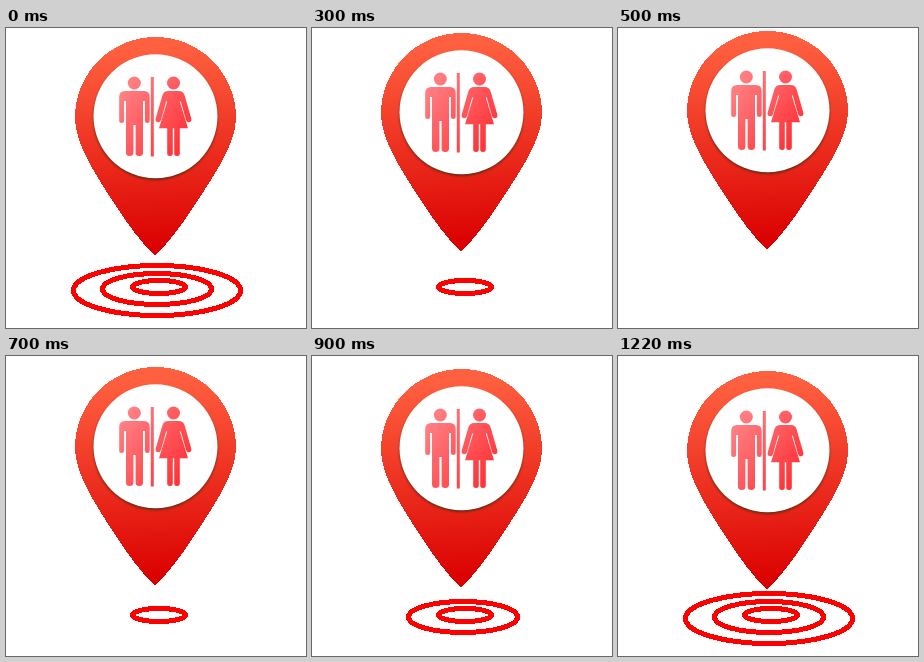
An HTML page for the animation above (1300 ms loop, 300 by 300 pixels).

```html
<!DOCTYPE html>
<html lang="en">
<head>
<meta charset="utf-8">
<style>
  html, body { margin: 0; width: 100%; height: 100%; overflow: hidden; background: #fff; }
  svg { display: block; width: 300px; height: 300px; }
  .ring { fill: none; stroke: #f00; stroke-width: 5; shape-rendering: crispEdges; }
</style>
</head>
<body>
<svg viewBox="0 0 300 300">
  <defs>
    <linearGradient id="red" gradientUnits="userSpaceOnUse" x1="144" y1="20" x2="155" y2="222">
      <stop offset="0" stop-color="#ff6040"/>
      <stop offset="1" stop-color="#da0000"/>
    </linearGradient>
    <linearGradient id="pink" gradientUnits="userSpaceOnUse" x1="115" y1="65" x2="180" y2="112">
      <stop offset="0" stop-color="#ff8084"/>
      <stop offset="1" stop-color="#ff3338"/>
    </linearGradient>
    <filter id="soft"><feGaussianBlur stdDeviation="1"/></filter>
  </defs>

  <ellipse class="ring" cx="153" cy="259" rx="26.500" ry="6.500"/>
  <ellipse class="ring" cx="151" cy="261" rx="54.500" ry="15.500"/>
  <ellipse class="ring" cx="151" cy="262.500" rx="83.500" ry="25"/>

  <g id="pin">
    <path fill="url(#red)" shape-rendering="crispEdges"
      d="M149 228 Q129 208 110 178 C86 142 69 114 69 89.500 A80.500 80.500 0 0 1 230 89.500 C230 114 212 142 188 178 Q169 208 149 228 Z"/>
    <circle cx="149.500" cy="90" r="62" fill="#4a2c10" opacity=".8" filter="url(#soft)"/>
    <circle cx="149.500" cy="88.300" r="62" fill="#fff"/>
    <g fill="url(#pink)">
      <circle cx="128.300" cy="55" r="6.500"/>
      <path d="M119 63 H138 Q143.700 63 143.700 69 V92.500 Q143.700 95 141.300 95 T138.900 92.500 V73 H137 V124.500 Q137 128 133.300 128 T129.600 124.500 V97 H127.400 V124.500 Q127.400 128 123.700 128 T120 124.500 V73 H118.100 V92.500 Q118.100 95 115.600 95 T113.200 92.500 V69 Q113.200 63 119 63 Z"/>
      <rect x="144.800" y="49" width="3" height="79.500"/>
      <circle cx="167.500" cy="55" r="6.500"/>
      <path d="M162 63 H173 Q177 63 178.500 67 L185.300 90.500 Q186 93.500 183.300 94.200 Q181 94.700 180 92 L174.800 73.500 H173.800 L182 100.200 H173.800 V125.500 Q173.800 128 171 128 T168.200 125.500 V100.200 H166.800 V125.500 Q166.800 128 164 128 T161.200 125.500 V100.200 H153 L161.200 73.500 H160.200 L155 92 Q154 94.700 151.700 94.200 Q149 93.500 149.700 90.500 L156.500 67 Q158 63 162 63 Z"/>
    </g>
  </g>
</svg>
<script>
  const pin = document.getElementById('pin');
  const rings = document.querySelectorAll('.ring');
  const start = performance.now();

  function draw() {
    const time = (performance.now() - start) % 1300;
    const step = Math.floor((time + 100) / 200);
    const rising = step < 4;
    const shift = rising ? -2 * step : 2 * (step - 3);
    const visible = Math.abs(3 - step);
    pin.setAttribute('transform', `translate(0 ${shift})`);
    rings.forEach((ring, i) => ring.style.display = i < visible ? '' : 'none');
    requestAnimationFrame(draw);
  }
  draw();
</script>
</body>
</html>
```
